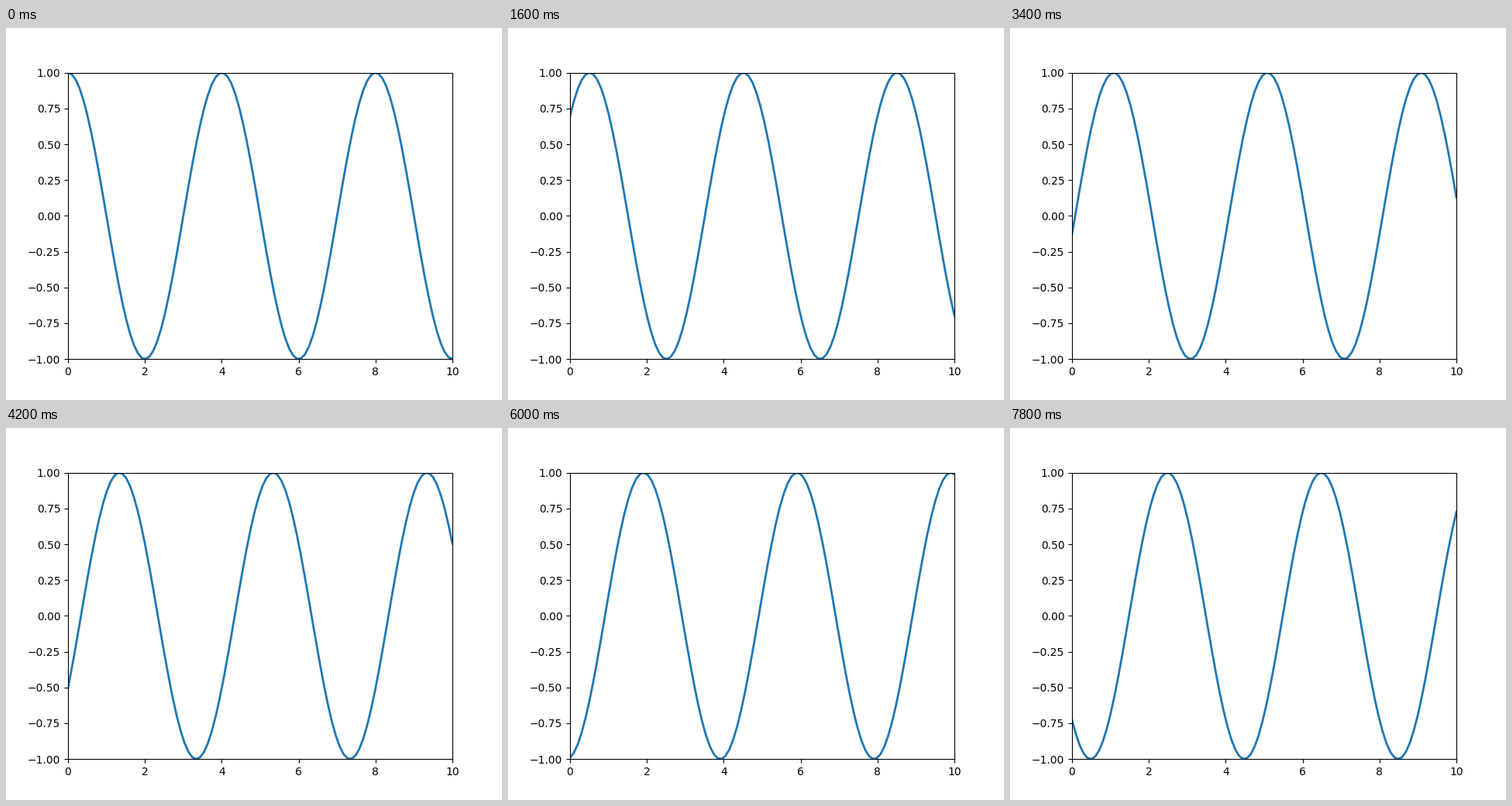
Write a matplotlib script that moves like this. It is 640 by 480 pixels and loops after 8000 ms.

```python
import numpy as np
import matplotlib.pyplot as plt
from matplotlib.animation import FuncAnimation

FRAMES = 40
INTERVAL = 200  # ms
PHASE_STEP = 0.1  # radians per frame
PERIOD = 4

x = np.linspace(0, 10, 100)


def wave(frame):
    return np.cos(2 * np.pi * x / PERIOD - PHASE_STEP * frame)


fig, ax = plt.subplots(figsize=(6.4, 4.8), dpi=100)
ax.set_xlim(0, 10)
ax.set_ylim(-1, 1)
line, = ax.plot(x, wave(0), color="#1f77b4", lw=2)


def update(frame):
    line.set_ydata(wave(frame))
    return line,


def init():
    return update(0)


anim = FuncAnimation(fig, update, frames=FRAMES, init_func=init,
                     interval=INTERVAL, repeat=True, repeat_delay=0,
                     blit=False)
plt.show()
```
